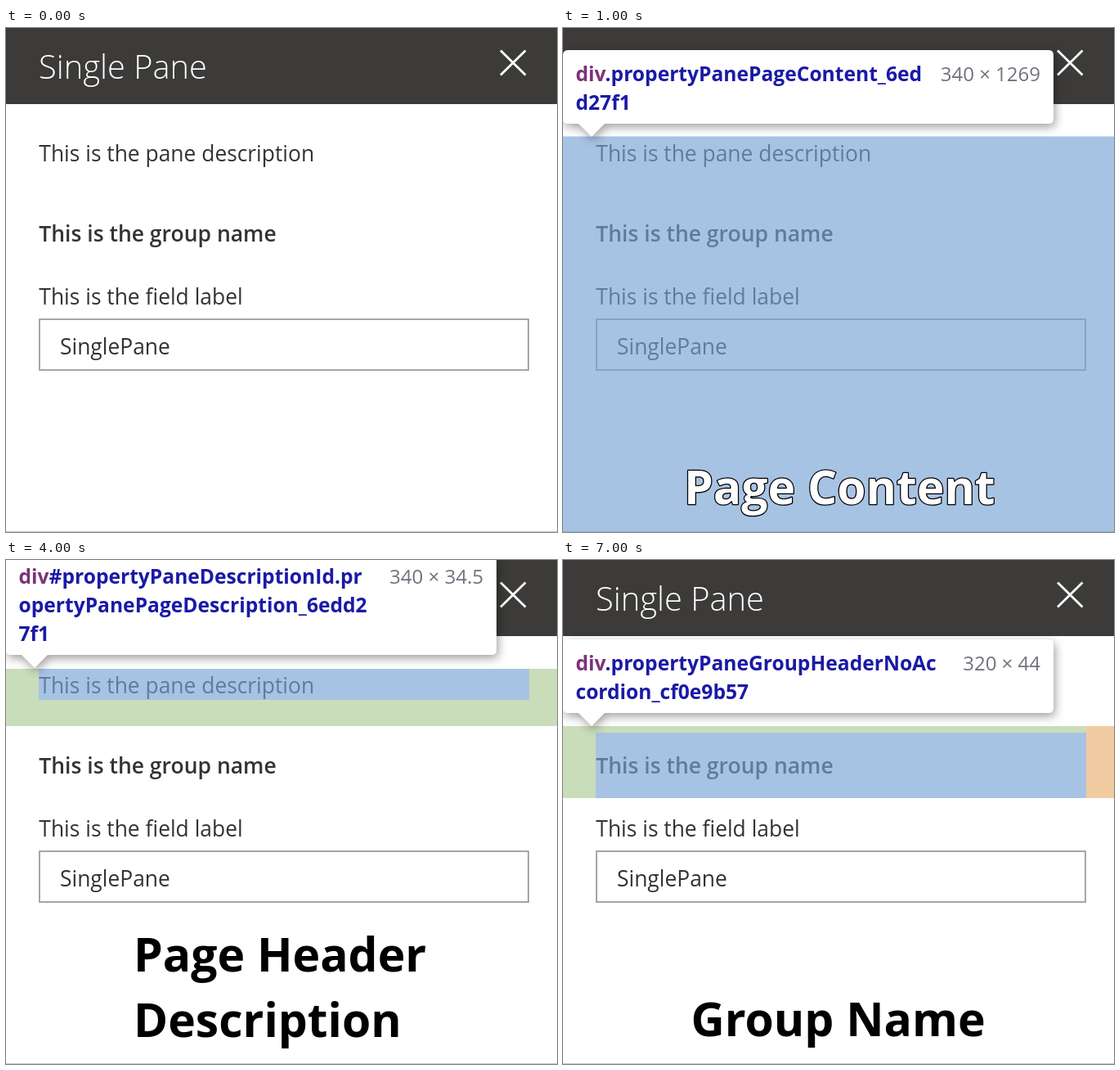
Write an HTML page that moves like this. It is 674x616 px and loops after 8 s.

```html
<!DOCTYPE html>
<html lang="en">
<head>
<meta charset="utf-8">
<title>Pane inspector</title>
<style>
  html, body { margin: 0; width: 100%; height: 100%; overflow: hidden; background: #fff; }
  svg { display: block; width: 674px; height: 616px; }
  text { font: 26.4px "Open Sans", "Noto Sans", sans-serif; fill: #333; white-space: pre; }
  .title { font-size: 39.8px; font-weight: 340; fill: #fff; }
  .group { font-weight: 600; font-size: 26.5px; }
  .selector { font-size: 24.6px; font-weight: 700; fill: #1a1aa6; }
  .tag { fill: #7d3278; }
  .size { font-size: 24px; fill: #73717d; text-anchor: end; }
  .caption { font-size: 57px; font-weight: 700; fill: #000; }
  .outlined { fill: #fff; stroke: #000; stroke-width: 2.5; stroke-linejoin: round; paint-order: stroke; }
  .bubble { fill: #fff; filter: drop-shadow(2px 4px 6px rgba(0, 0, 0, .38)); }
</style>
</head>
<body>
<svg viewBox="0 0 674 616">
  <rect width="674" height="616" fill="#fff"/>
  <rect width="674" height="93" fill="#3c3b39"/>
  <text class="title" x="40" y="61.5">Single Pane</text>
  <path d="M605 27.5L635.5 57.5M635.5 27.5L605 57.5" stroke="#fff" stroke-width="2.8"/>
  <text x="40.3" y="163">This is the pane description</text>
  <text class="group" x="40.3" y="261">This is the group name</text>
  <text x="40.3" y="338">This is the field label</text>
  <rect x="41" y="356" width="598" height="62" fill="none" stroke="#a6a6a6" stroke-width="2"/>
  <text x="66" y="399">SinglePane</text>
  <rect y="615" width="674" height="1" fill="#c8c8c8"/>
  <g id="inspector"></g>
</svg>
<script>
const LOOP = 8000;
const BLUE = "rgba(120,163,214,.65)";
const GREEN = "rgba(147,187,119,.5)";
const ORANGE = "rgba(234,176,111,.65)";

const rect = (x, y, right, bottom, fill) =>
  `<rect x="${x}" y="${y}" width="${right - x}" height="${bottom - y}" fill="${fill}"/>`;

const caption = (x, y, words, extra = "") =>
  `<text class="caption ${extra}" x="${x}" y="${y}">${words}</text>`;

// White bubble with a pointer below and the element's selector inside
function tooltip(top, bottom, size, lines) {
  const tip = bottom + 16;
  const shape = `M6 ${top}H594Q600 ${top} 600 ${top + 6}V${bottom - 6}Q600 ${bottom} 594 ${bottom}` +
    `H51L35 ${tip}L19 ${bottom}H6Q0 ${bottom} 0 ${bottom - 6}V${top + 6}Q0 ${top} 6 ${top}Z`;
  const baseline = i => top + 38 + i * 35;
  const rows = lines.map((line, i) =>
    `<text class="selector" x="15.5" y="${baseline(i)}">` +
    `${i ? "" : '<tspan class="tag">div</tspan>'}${line}</text>`);
  return `<path class="bubble" d="${shape}"/>${rows.join("")}` +
    `<text class="size" x="584" y="${baseline(0)}">${size}</text>`;
}

const scenes = [
  { start: 0, markup: "" },
  {
    start: 1000,
    markup: rect(0, 132.5, 674, 616, BLUE) +
      tooltip(27, 117, "340 × 1269", [".propertyPanePageContent_6ed", "d27f1"]) +
      caption(148, 582, "Page Content", "outlined")
  },
  {
    start: 4000,
    markup: rect(0, 133, 40, 171, GREEN) + rect(640, 133, 674, 171, GREEN) +
      rect(0, 171, 674, 203, GREEN) + rect(40, 133, 640, 171, BLUE) +
      tooltip(-9, 116, "340 × 34.5",
        ["#propertyPaneDescriptionId.pr", "opertyPanePageDescription_6edd2", "7f1"]) +
      caption(156, 503, "Page Header") + caption(156, 583, "Description")
  },
  {
    start: 7000,
    markup: rect(0, 203, 640, 211, GREEN) + rect(0, 211, 40, 291, GREEN) +
      rect(40, 211, 640, 291, BLUE) + rect(640, 203, 674, 291, ORANGE) +
      tooltip(97, 187, "320 × 44", [".propertyPaneGroupHeaderNoAc", "cordion_cf0e9b57"]) +
      caption(156.5, 582, "Group Name")
  }
];

const inspector = document.getElementById("inspector");
let shown;

function render(time) {
  const scene = scenes.findLast(s => s.start <= time % LOOP);
  if (scene !== shown) {
    inspector.innerHTML = scene.markup;
    shown = scene;
  }
}

function tick(now) {
  render(now);
  requestAnimationFrame(tick);
}

render(0);
requestAnimationFrame(tick);
</script>
</body>
</html>
```
